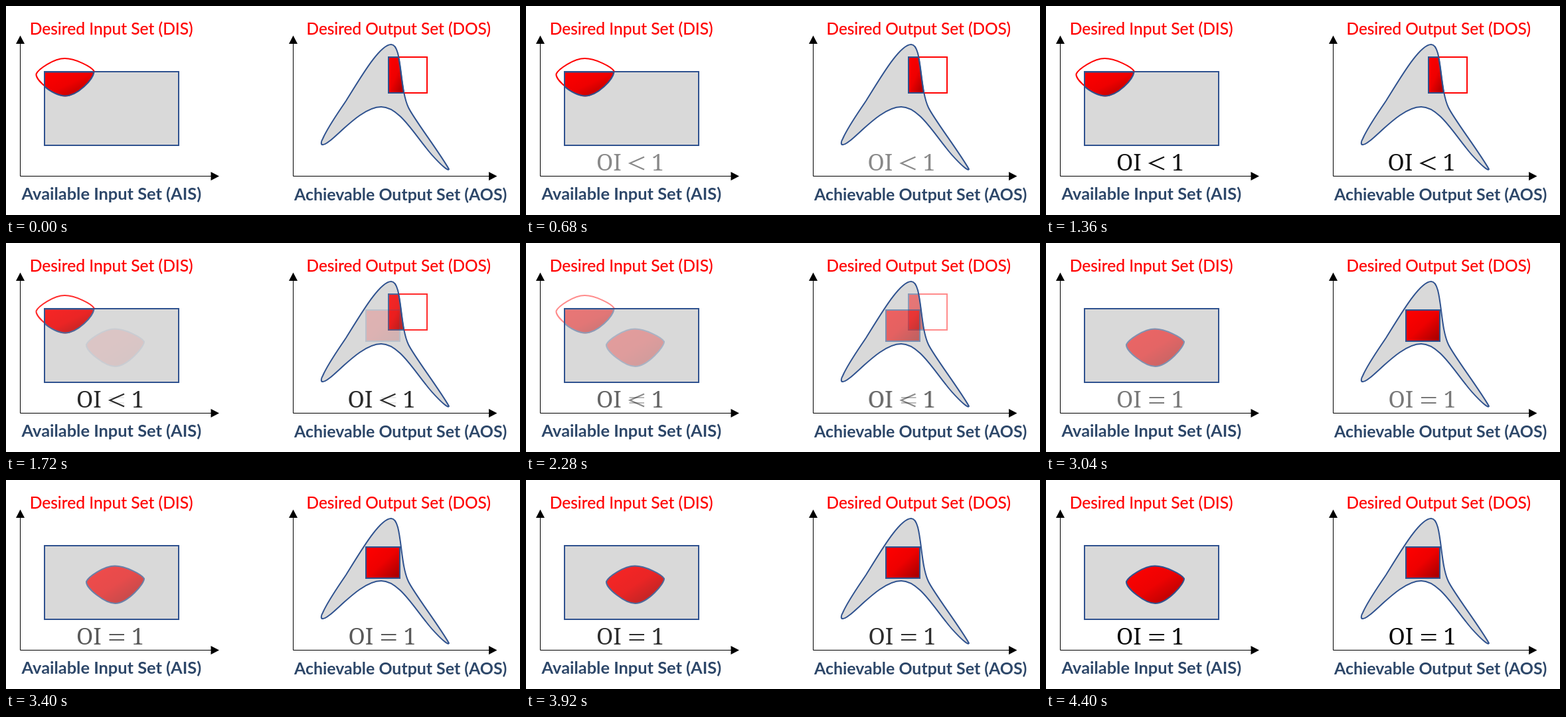
An HTML page for the animation above (4440 ms loop, 774 px wide and 315 px high).

```html
<!DOCTYPE html>
<html lang="en">
<head>
<meta charset="utf-8">
<title>Operability index</title>
<style>
  html, body { margin: 0; width: 100%; height: 100%; overflow: hidden; background: #fff; }
  svg { display: block; width: 774px; height: 315px; }
  .axis { stroke: #000; stroke-width: 1; fill: none; }
  .set { fill: #d9d9d9; stroke: #2f528f; stroke-width: 2; }
  .hit { fill: url(#red); stroke: #2f528f; stroke-width: 2; }
  .desired { fill: none; stroke: #f00; stroke-width: 2; }
  .title { font-family: Lato, Carlito, sans-serif; fill: #f00; stroke: #f00; stroke-width: .25; }
  .caption { font-family: Lato, Carlito, sans-serif; font-weight: 700; fill: #2d4769; }
  .math { font: 34px "Noto Serif", serif; }
  .sign { fill: none; stroke: #000; stroke-width: 2.2; }
</style>
</head>
<body>
<svg viewBox="0 0 774 315">
  <defs>
    <linearGradient id="red" x1="0" y1="0" x2="1" y2="1">
      <stop offset="0" stop-color="#ff0000"/>
      <stop offset=".5" stop-color="#ee0000"/>
      <stop offset="1" stop-color="#a00000"/>
    </linearGradient>
    <path id="blob" d="M121,153 C124,146 147,129.5 164,129.5 C180,129.5 204,142 208,148.5 C209,156 183,186 164.5,186 C149,186 120,163 121,153 Z"/>
    <g id="less">
      <text class="math" x="106" y="248">OI</text>
      <path class="sign" d="M178,227.5 L156.5,237 L178,246.5"/>
      <text class="math" x="189" y="248">1</text>
    </g>
    <g id="equal">
      <text class="math" x="106" y="248">OI</text>
      <path class="sign" d="M155.5,233 H178 M155.5,241 H178"/>
      <text class="math" x="189" y="248">1</text>
    </g>
  </defs>

  <path class="axis" d="M21.5,50 V256.5 H315 M432.5,50 V256.5 H733"/>
  <path d="M21.5,44.5 l6.5,12.5 h-13 Z M432.5,44.5 l6.5,12.5 h-13 Z M321,256.5 l-12.5,-6.5 v13 Z M739.5,256.5 l-12.5,-6.5 v13 Z"/>

  <rect class="set" x="58" y="99" width="202" height="111"/>
  <path class="set" d="M477,200 C485,182 500,161 512,143 C531,113 562,58 580,58 C597,58 592,124 606,153
    C614,170 653,221 667,246 C665,251 641,225 632,213 C611,187 590,152 565,152
    C531,152 490,209 477,209 C474,209 474,205 477,200 Z"/>

  <g id="before">
    <use href="#blob" class="desired" x="-75.5" y="-50.5"/>
    <rect class="desired" x="576" y="77" width="58" height="54"/>
    <path class="hit" d="M58,99.5 H132.5 C131,111 108,135.5 89,135.5 C80,135.5 66,129 58,121 Z"/>
    <path class="hit" d="M576,77 H591 C593.5,88 595.5,112 599,131 H576 Z"/>
  </g>
  <use id="blobAfter" href="#blob" class="hit"/>
  <rect id="squareAfter" class="hit" x="542" y="101" width="51" height="47"/>

  <g id="textBefore"><use href="#less"/><use href="#less" x="408.5"/></g>
  <g id="textAfter"><use href="#equal"/><use href="#equal" x="409.5"/></g>

  <text class="title" x="35.7" y="43" font-size="24.6">Desired Input Set (DIS)</text>
  <text class="title" x="452.6" y="43" font-size="24.35">Desired Output Set (DOS)</text>
  <text class="caption" x="23.5" y="292" font-size="25.4">Available Input Set (AIS)</text>
  <text class="caption" x="434" y="293" font-size="24.9">Achievable Output Set (AOS)</text>
</svg>
<script>
  const LOOP = 4440, SWITCH = 1460, QUICK = 1500, SLOW = 2980;
  const progress = (t, start, length) => Math.min(1, Math.max(0, (t - start) / length));
  const fade = (id, opacity) =>
    document.getElementById(id).setAttribute("opacity", opacity.toFixed(4));

  function draw(t) {
    const quick = progress(t, SWITCH, QUICK);
    const slow = progress(t, SWITCH, SLOW);
    fade("before", 1 - quick);
    fade("squareAfter", quick);
    fade("blobAfter", slow);
    fade("textBefore", progress(t, 0, SWITCH) * (1 - quick));
    fade("textAfter", slow);
  }

  const begin = performance.now();
  function tick() {
    draw((performance.now() - begin) % LOOP);
    requestAnimationFrame(tick);
  }
  draw(0);
  requestAnimationFrame(tick);
</script>
</body>
</html>
```
